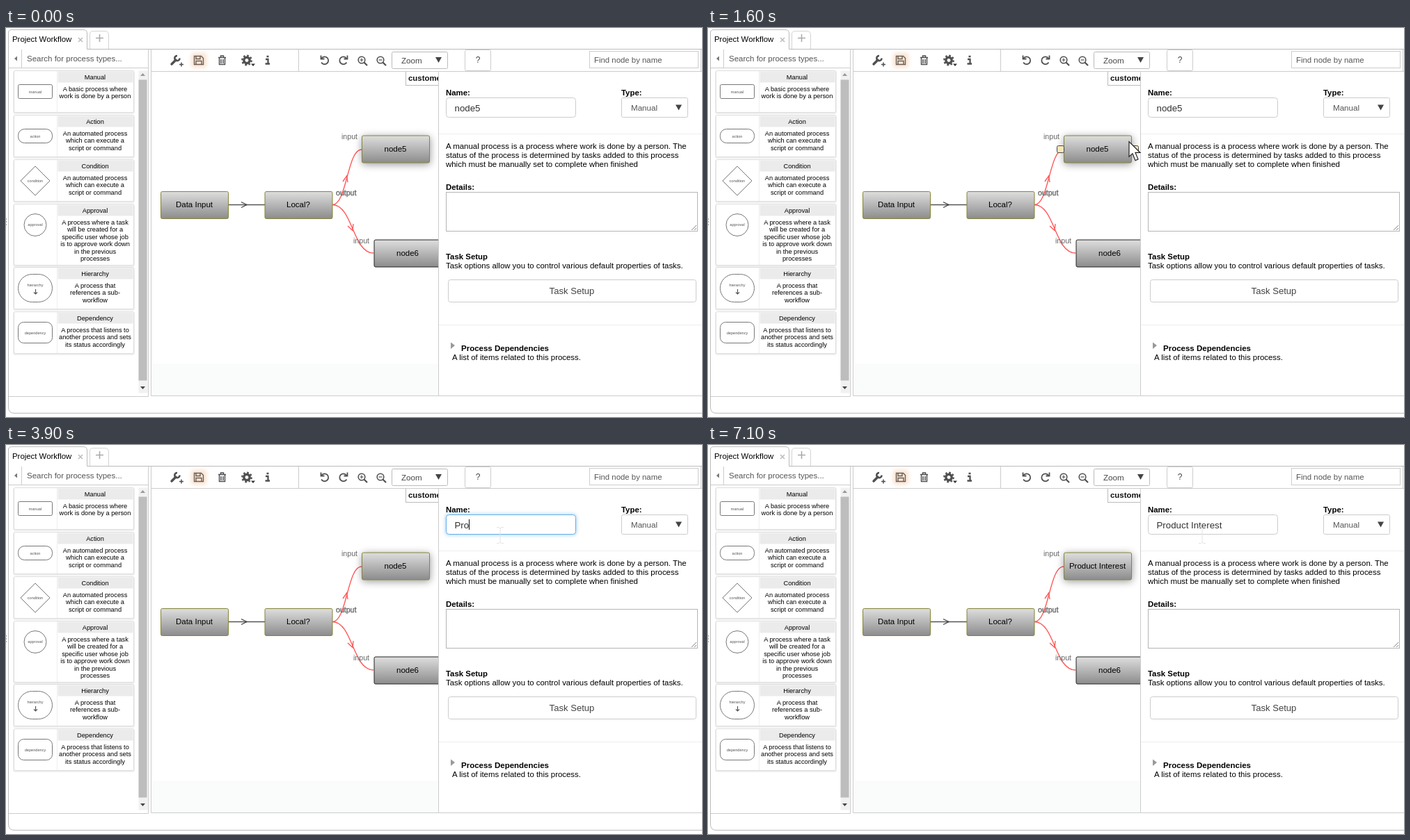
Write an HTML page that moves like this. It is 1000 px wide and 560 px high and loops after 7.2 s.

```html
<!DOCTYPE html>
<html lang="en">
<head>
<meta charset="utf-8">
<title>Project Workflow</title>
<style>
html, body { margin: 0; width: 100%; height: 100%; overflow: hidden; background: #fff; }
svg { display: block; width: 1000px; height: 560px; }
text { font-family: "Liberation Sans", Arial, sans-serif; white-space: pre; }
</style>
</head>
<body>
<svg id="stage" viewBox="0 0 1000 560" xmlns="http://www.w3.org/2000/svg">
  <defs>
    <linearGradient id="steel" x2="0" y2="1">
      <stop stop-color="#dedede"/><stop offset="1" stop-color="#8c8c8c"/>
    </linearGradient>
    <filter id="soft" x="-30%" y="-60%" width="160%" height="220%"><feGaussianBlur stdDeviation="6"/></filter>
    <filter id="glow" x="-20%" y="-50%" width="140%" height="200%"><feGaussianBlur stdDeviation="2.5"/></filter>
    <clipPath id="view"><rect x="210" y="63" width="411" height="466"/></clipPath>
  </defs>
</svg>
<script>
const stage = document.getElementById('stage');
let layer = stage;

function add(tag, attrs, content) {
  const el = document.createElementNS(stage.namespaceURI, tag);
  for (const k in attrs) el.setAttribute(k, attrs[k]);
  if (content !== undefined) el.textContent = content;
  return layer.appendChild(el);
}
const box = (x, y, x2, y2, fill, stroke, rx = 0, more) =>
  add('rect', { x: x + .5, y: y + .5, width: x2 - x, height: y2 - y, rx, fill, stroke: stroke || 'none', ...more });
const path = (d, stroke, width = 1, fill = 'none', more) =>
  add('path', { d, stroke, 'stroke-width': width, fill, ...more });
const text = (x, y, s, size = 11.4, fill = '#000', more) =>
  add('text', { x, y, 'font-size': size, fill, ...more }, s);
const mid = (x, y, s, size, fill, more) => text(x, y, s, size, fill, { 'text-anchor': 'middle', ...more });
const ring = (cx, cy, r, stroke, width, more) =>
  add('circle', { cx, cy, r, fill: 'none', stroke, 'stroke-width': width, ...more });
const bold = { 'font-weight': 'bold' };
const group = attrs => { layer = stage; layer = add('g', attrs); };

// Window frame and tabs
path('M116.5 30.5H1000M3.5 5V546Q3.5 554.5 12 554.5H1000', '#bbb');
path('M3.5 31V7Q3.5 2.5 8 2.5H111Q116.5 2.5 116.5 8V30.5', '#bbb');
path('M120.5 30V9Q120.5 4.5 125 4.5H142Q147.5 4.5 147.5 10V30', '#d4d4d4');
text(9, 20, 'Project Workflow');
path('M104 14l6 6m0-6l-6 6', '#bbb', 1.5);
path('M129 14.5h11M134.5 9v11', '#aaa', 1.6);
path('M.5 274v2m0 2v2m0 2v2', '#aaa');

// Palette
path('M4 57.5H204.5M22.5 31V57M204.5 31V530.5H4M208.5 31V529.5H1000', '#ccc');
path('M16 40.5v7l-4-3.5z', 'none', 0, '#777');
text(30, 48, 'Search for process types...', 11.5, '#555');
box(190, 61, 203, 525, '#f1f1f1');
box(190, 74, 202, 507, '#bdbdbd');
path('M193 69l3.5-4 3.5 4z', 'none', 0, '#999');
path('M193 516l3.5 4 3.5-4z', 'none', 0, '#444');

function tile(y, y2, title, lines) {
  box(11, y + 1, 183, y2 + 1, 'none', '#eee', 2, { 'stroke-width': 3 });
  box(11, y, 183, y2, '#fff', '#ddd', 2);
  box(74, y + 1, 182, y + 17, '#ebebeb');
  path(`M73.5 ${y + 1}V${y2}`, '#eee');
  mid(128, y + 12.5, title, 9.25);
  lines.split('|').forEach((s, i) => mid(128, y + 29.5 + i * 10.5, s, 9.25));
}
tile(61, 121, 'Manual', 'A basic process where|work is done by a person');
tile(125, 185, 'Action', 'An automated process|which can execute a|script or command');
tile(189, 249, 'Condition', 'An automated process|which can execute a|script or command');
tile(253, 341, 'Approval', 'A process where a task|will be created for a|specific user whose job|is to approve work down|in the previous|processes');
tile(344, 404, 'Hierarchy', 'A process that|references a sub-|workflow');
tile(408, 468, 'Dependency', 'A process that listens to|another process and sets|its status accordingly');
const ink = '#777';
box(17, 81, 66, 101, '#fff', ink, 2);
box(17, 145, 66, 165, '#fff', ink, 9);
path('M42 199L63 220 42 241 21 220z', ink);
ring(42, 283.5, 16, ink, 1);
box(17, 354, 66, 394, '#fff', ink, 20);
box(17, 423, 66, 453, '#fff', ink, 8);
[['manual', 93.5], ['action', 157.5], ['condition', 221.5], ['approval', 285], ['hierarchy', 371.5], ['dependency', 440.5]]
  .forEach(([s, y]) => mid(42, y, s, 5.6, '#555'));
path('M42.5 376v7m-2.5-2.5l2.5 2.5 2.5-2.5', '#555', 1.2);

// Toolbar
path('M209 62.5H1000M420.5 31V62M998.5 31V62', '#ccc');
const dark = '#505050';
box(265, 35, 288, 57, '#fbe6d6', 'none', 5, { filter: 'url(#glow)' });
path('M238 52l6-6', dark, 3.4, 'none', { 'stroke-linecap': 'round' });
path('M249.5 43.5a3.6 3.6 0 1 1-3.5-3.5', dark, 2.6);
path('M249 52.5h6m-3-3v6', dark, 1.5);
path('M270.5 40.5h10l3 3v9h-13zM273 40.5v4h6v-4M273 52.5v-5h8v5', '#6a5d55', 1.4);
path('M305 42.5h11M308.5 42v-2h4v2M306.5 43v9.5h8V43M309 45v6m3-6v6', dark, 1.5);
ring(346, 46.5, 4.2, dark, 3.4);
ring(346, 46.5, 6.7, dark, 2.4, { 'stroke-dasharray': '2.63 2.63' });
path('M352 51.5h6l-3 3.5z', 'none', 0, '#333');
path('M374.5 41h3M373 45h3.5v6M372.5 51.5h6.5', dark, 2.3);
path('M453.5 43.5a5.4 5.4 0 1 1-.4 6M452.5 39.5v5h5', dark, 1.8);
path('M489 43.5a5.4 5.4 0 1 0 .4 6M490.5 39.5v5h-5', dark, 1.8);
for (const x of [511, 538]) {
  ring(x, 46, 4.8, dark, 1.6);
  path(`M${x + 3.5} 49.5l4.5 4.5`, dark, 2.2);
  path(`M${x - 2.5} 46h5` + (x < 520 ? 'm-2.5-2.5v5' : ''), dark, 1.2);
}
box(554, 34, 634, 58, '#fff', '#bbb', 2);
text(568, 50.5, 'Zoom', 11.6, '#444');
path('M617 42h9l-4.5 8z', 'none', 0, '#444');
box(659, 31, 696, 61, '#fff', '#ccc', 2);
mid(678, 50, '?', 12, '#444');
box(838, 33, 994, 57, '#fff', '#ccc');
text(845, 49.5, 'Find node by name', 11.4, '#555');

// Workflow canvas
group({ 'clip-path': 'url(#view)' });
box(210, 483, 621, 529, '#fafcfc');
box(574, 62, 640, 82, '#fff', '#bbb');
text(578, 76, 'customer', 11.4, '#111', bold);
path('M319 254.5H372', '#555', 1.3);
path('M338 250.5l8 4-8 4', '#444', 1.3);
const red = '#ff5a5a';
path('M469 254.5C490 254.5 490 175 511 175M469 254.5C498 254.5 498 324 528 324', red, 1.4);
path('M484 221l5.5-8 1.5 9M491 285l7 6.5 1-9.5', red, 1.4);
box(511, 156, 609, 196, '#000', 'none', 4, { opacity: .4, filter: 'url(#soft)' });
function node(x, y, label, border) {
  box(x, y, x + 97, y + 39, 'url(#steel)', border, 2);
  return mid(x + 48.5, y + 23, label, 11.5);
}
const olive = '#85853a';
node(222, 235, 'Data Input', olive);
node(371.5, 235, 'Local?', olive);
const nodeName = node(511, 154.5, 'node5', olive);
node(528.5, 304.5, 'node6', '#222');
text(482, 160, 'input', 10.6, '#666');
text(499, 310, 'input', 10.6, '#666');
text(474, 240.5, 'output', 10.6, '#666', { stroke: '#666', 'stroke-width': .35 });

const port = (x, y) => box(x, y, x + 10, y + 10, '#fbe6b8', '#444', 2);
const ports5 = [port(501, 169), port(608, 169)], ports6 = [port(518, 319)];

// Properties panel
group();
path('M621.5 63V529', '#ccc');
path('M622 152.5H1000M622 427.5H1000', '#eee');
text(632, 97, 'Name:', 11.4, '#000', bold);
text(884, 97, 'Type:', 11.4, '#000', bold);
const halo = box(632, 100, 818, 128, '#66afe9', '#66afe9', 4, { filter: 'url(#glow)', 'stroke-width': 3 });
const field = box(632, 100, 818, 128, '#fff', '#ccc', 4);
const marked = box(644, 106, 682, 122, '#3390ff');
const value = text(644.5, 119.5, '', 13.3);
const caret = add('rect', { y: 107, width: 1, height: 15, fill: '#111' });
box(884, 100, 979, 128, '#fff', '#ccc', 2);
text(898, 118.5, 'Manual', 11.6, '#555');
path('M962 110.5h9l-4.5 8z', 'none', 0, '#444');
['A manual process is a process where work is done by a person. The',
 'status of the process is determined by tasks added to this process',
 'which must be manually set to complete when finished']
  .forEach((s, i) => text(632, 174 + i * 13.2, s, 11.45));
text(632, 233, 'Details:', 11.4, '#000', bold);
box(632, 236, 993, 292, '#fff', '#b5b5b5');
path('M985 291l7-7m-3 7l3-3', '#888');
text(632, 332.5, 'Task Setup', 11.4, '#000', bold);
text(632, 346, 'Task options allow you to control various default properties of tasks.');
box(635, 362, 991, 394, '#fff', '#ccc', 3);
mid(813, 383, 'Task Setup', 13.1, '#444');
path('M639 452.5l6 4.5-6 5z', 'none', 0, '#999');
text(654, 464.5, 'Process Dependencies', 11.5, '#000', bold);
text(641, 478, 'A list of items related to this process.');

// Pointers
const arrow = path('M0 0V21.5L5 17 9 27 13 25.2 9 15.8H16z', '#222', 1.2, '#fff');
const beam = path('M-5-11.5h3.5L0-10 1.5-11.5H5M0-10V10M-5 11.5h3.5L0 10 1.5 11.5H5', '#e4e4e4');

const LOOP = 7200, NAME = 'Product Interest';
const route = [[100, 640, 560], [600, 588, 299], [800, 588, 292], [1100, 579, 172], [1400, 579, 172], [2100, 710, 130], [LOOP, 710, 130]];
const keyTime = i => i < 3 ? 3500 + i * 200 : i < 15 ? 3800 + i * 100 : 5400;

function pointer(t) {
  let i = 1;
  while (i < route.length - 1 && t > route[i][0]) i++;
  const [t0, x0, y0] = route[i - 1], [t1, x1, y1] = route[i];
  const u = Math.min(1, Math.max(0, (t - t0) / (t1 - t0))), e = u * u * (3 - 2 * u);
  return [x0 + (x1 - x0) * e, y0 + (y1 - y0) * e];
}
const show = (el, on) => el.setAttribute('visibility', on ? 'visible' : 'hidden');

function draw(now) {
  const t = Math.floor(now % LOOP / 100) * 100;
  const [x, y] = pointer(t);
  const over = (l, top) => x >= l && x <= l + 97 && y >= top && y <= top + 40;
  const onPanel = t > 1400 && x > 632;
  ports5.forEach(p => show(p, over(511, 155)));
  ports6.forEach(p => show(p, over(528, 298)));
  show(arrow, t >= 100 && !onPanel);
  show(beam, onPanel);
  for (const p of [arrow, beam]) p.setAttribute('transform', `translate(${x} ${y})`);

  let typed = 0;
  while (typed < NAME.length && t >= keyTime(typed)) typed++;
  const focused = t >= 2400 && t < 7000, selected = t >= 2600 && !typed;
  value.textContent = typed ? NAME.slice(0, typed) : 'node5';
  value.setAttribute('fill', selected ? '#fff' : '#333');
  nodeName.textContent = t >= 7000 ? NAME : 'node5';
  show(marked, selected);
  show(halo, focused);
  halo.setAttribute('opacity', Math.min(.5, (t - 2300) / 400));
  field.setAttribute('stroke', focused ? '#66afe9' : '#ccc');

  const lastKey = typed ? keyTime(typed - 1) : 2400;
  show(caret, focused && !selected && (t - lastKey) % 1000 < 500);
  caret.setAttribute('x', Math.round(644.5 + value.getComputedTextLength()));
}

const start = performance.now();
function tick() {
  draw(performance.now() - start);
  requestAnimationFrame(tick);
}
tick();
</script>
</body>
</html>
```
